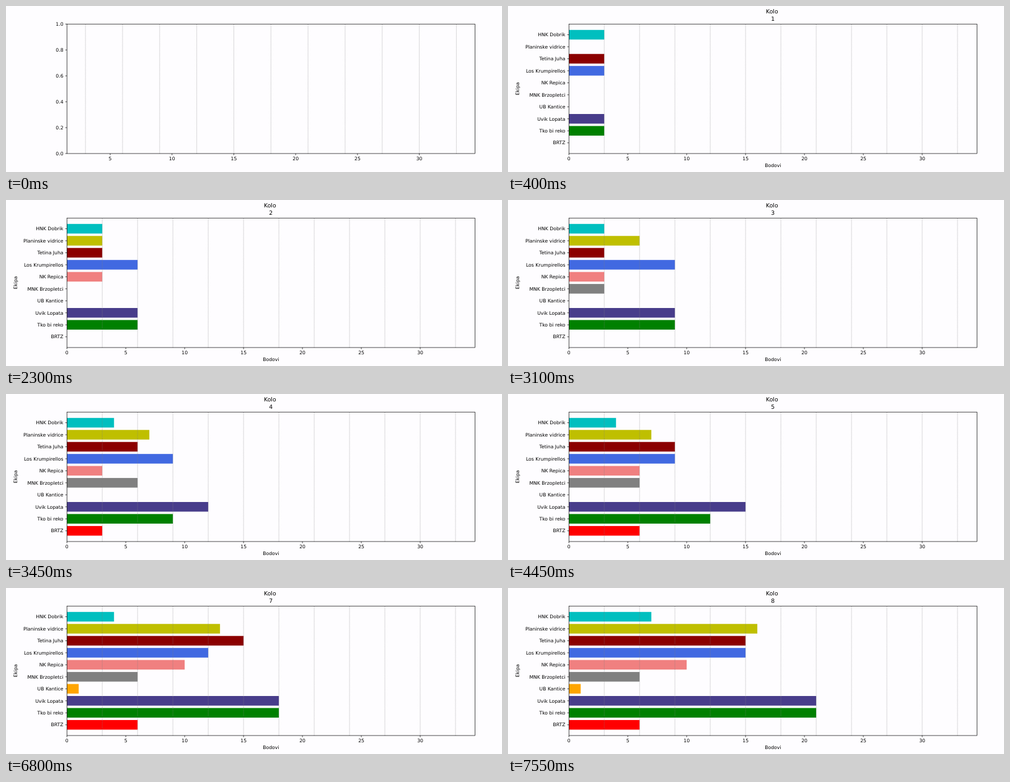
These frames come from a looping animation (800 by 269 pixels, 8000 ms). An HTML page:

```html
<!DOCTYPE html>
<html lang="hr">
<head>
<meta charset="utf-8">
<title>Bodovi po kolima</title>
<style>
  html, body { margin: 0; width: 100%; height: 100%; overflow: hidden; background: #fefdff; }
  svg { display: block; width: 100vw; height: 100vh; }
  text { font: 7.7px "DejaVu Sans", sans-serif; fill: #000; text-rendering: geometricPrecision; white-space: pre; }
  .title { font-size: 9.26px; }
  .mid { text-anchor: middle; }
  .end { text-anchor: end; }
  .axis { fill: none; stroke: #000; stroke-width: .7; }
  .grid { stroke: #808080; stroke-width: .77; stroke-dasharray: .77 1.27; }
</style>
</head>
<body>
<svg id="stage" viewBox="0 0 800 269"></svg>
<script>
const LOOP = 8000, FIRST = 400, ROUND = 1000;
const BOX = { x: 98.25, y: 29.25, w: 658.1, h: 209.8 };
const BOTTOM = BOX.y + BOX.h, MIDDLE = BOX.x + BOX.w / 2;
const PITCH = BOX.h / 10.78, THICK = PITCH * 0.8;
const LAST = 33, STEP = 3, MARGIN = LAST * 0.05;

// Team, bar colour, results by round: win, draw or loss
const TEAMS = [
  ["HNK Dobrik", "#00bfbf", "WLLDLLLW"],
  ["Planinske vidrice", "#bfbf00", "LWWDLWWW"],
  ["Tetina Juha", "darkred", "WLLWWWWL"],
  ["Los Krumpirellos", "royalblue", "WWWLLLWW"],
  ["NK Repica", "lightcoral", "LWLLWDWL"],
  ["MNK Brzopletci", "gray", "LLWWLLLL"],
  ["UB Kantice", "orange", "LLLLLDLL"],
  ["Uvik Lopata", "darkslateblue", "WWWWWWLW"],
  ["Tko bi reko", "green", "WWWLWWWW"],
  ["BRTZ", "red", "LLLWWLLL"]
];
const WORTH = { W: 3, D: 1, L: 0 };
const points = (form, rounds) => [...form.slice(0, rounds)].reduce((sum, r) => sum + WORTH[r], 0);

const stage = document.getElementById("stage");

function add(parent, tag, attrs, text) {
  const el = document.createElementNS("http://www.w3.org/2000/svg", tag);
  for (const key in attrs) el.setAttribute(key, attrs[key]);
  if (text !== undefined) el.textContent = text;
  parent.appendChild(el);
  return el;
}

const line = (g, x1, y1, x2, y2, cls) => add(g, "line", { x1, y1, x2, y2, class: cls });
const label = (g, x, y, text, cls) => add(g, "text", { x, y, class: cls }, text);
const rowY = i => BOX.y + BOX.h / 2 + (i - (TEAMS.length - 1) / 2) * PITCH;

function xAxis(g, min, max) {
  const at = v => BOX.x + (v - min) / (max - min) * BOX.w;
  for (let v = STEP; v <= LAST; v += STEP) line(g, at(v), BOTTOM, at(v), BOX.y, "grid");
  for (let v = Math.ceil(min / 5) * 5; v <= max; v += 5) {
    line(g, at(v), BOTTOM, at(v), BOTTOM + 2.7, "axis");
    label(g, at(v), 250.4, v, "mid");
  }
}

function yTick(g, y, text) {
  line(g, BOX.x - 2.7, y, BOX.x, y, "axis");
  label(g, BOX.x - 5.7, y + 2.7, text, "end");
}

const empty = add(stage, "g", {});
xAxis(empty, STEP / 2, LAST + STEP / 2);
for (let i = 0; i <= 5; i++) yTick(empty, BOTTOM - i * BOX.h / 5, (i / 5).toFixed(1));

const chart = add(stage, "g", {});
const bars = TEAMS.map(([, fill], i) => add(chart, "rect", {
  x: BOX.x, y: rowY(i) - THICK / 2, height: THICK, fill
}));
xAxis(chart, 0, LAST + MARGIN);
TEAMS.forEach(([name], i) => yTick(chart, rowY(i), name));
label(chart, MIDDLE - 1.5, 12.1, "Kolo", "title mid");
const round = label(chart, MIDDLE, 24, "", "title mid");
label(chart, MIDDLE, 261.2, "Bodovi", "mid");
add(chart, "text", { class: "mid", transform: "translate(18.3 134) rotate(-90)" }, "Ekipa");

add(stage, "rect", { x: BOX.x, y: BOX.y, width: BOX.w, height: BOX.h, class: "axis" });

function draw(t) {
  const n = Math.floor((t - FIRST) / ROUND) + 1;
  empty.style.display = n ? "none" : "";
  chart.style.display = n ? "" : "none";
  round.textContent = n;
  bars.forEach((bar, i) => {
    bar.setAttribute("width", points(TEAMS[i][2], n) / (LAST + MARGIN) * BOX.w);
  });
}

const start = performance.now();
function tick() {
  draw((performance.now() - start) % LOOP);
  requestAnimationFrame(tick);
}
draw(0);
requestAnimationFrame(tick);
</script>
</body>
</html>
```
